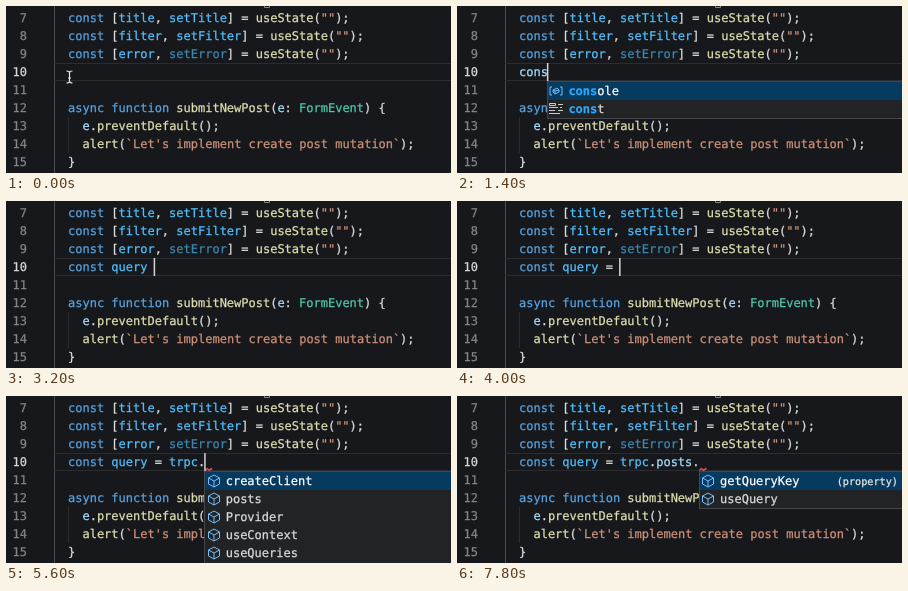
An HTML page with a canvas that plays this animation: 445 by 167 pixels, repeating every 8 s.

```html
<!DOCTYPE html>
<html lang="en">
<head>
<meta charset="utf-8">
<title>Code editor typing</title>
<style>
  html, body { margin: 0; width: 100%; height: 100%; overflow: hidden; background: #17181c; }
  canvas { display: block; width: 445px; height: 167px; }
</style>
</head>
<body>
<canvas id="stage"></canvas>
<script>
const W = 445, H = 167, LOOP = 8000;
const LEFT = 62, CHAR = 7.22, ROW = 18, MAX_ROWS = 5;
const FAMILY = '"DejaVu Sans Mono", monospace';
const COLORS = {
  text: '#dcdcdc', keyword: '#58a3e0', constant: '#4fc1ff', unused: '#3b87b0',
  call: '#dfdfb0', string: '#ce9178', type: '#4ec9b0', param: '#a8e0ff'
};

const canvas = document.getElementById('stage');
const ctx = canvas.getContext('2d');
const ratio = window.devicePixelRatio || 1;
canvas.width = W * ratio;
canvas.height = H * ratio;
ctx.scale(ratio, ratio);
ctx.lineJoin = 'round';
if ('textRendering' in ctx) ctx.textRendering = 'geometricPrecision';

const stateLine = (name, setter, setterColor = 'constant') => [
  ['const ', 'keyword'], ['[', 'text'], [name, 'constant'], [', ', 'text'],
  [setter, setterColor], ['] = ', 'text'], ['useState', 'call'],
  ['(', 'text'], ['""', 'string'], [');', 'text']
];

const CODE = {
  7: stateLine('title', 'setTitle'),
  8: stateLine('filter', 'setFilter'),
  9: stateLine('error', 'setError', 'unused'),
  13: [['  e', 'param'], ['.', 'text'], ['preventDefault', 'call'], ['();', 'text']],
  14: [['  alert', 'call'], ['(', 'text'],
       ["`Let's implement create post mutation`", 'string'], [');', 'text']],
  15: [['}', 'text']]
};

// After a dangling "const " the highlighter reads the next words as names.
const signature = dangling => [
  ['async ', dangling ? 'constant' : 'keyword'], ['function ', dangling ? 'param' : 'keyword'],
  ['submitNewPost', 'call'], ['(', 'text'], ['e', 'param'],
  [': ', 'text'], ['FormEvent', 'type'], [') {', 'text']
];

const typedLine = count => [
  ['const ', count < 5 ? 'param' : 'keyword'], ['query', 'constant'], [' = ', 'text'],
  ['trpc', 'constant'], ['.', 'text'], ['posts', 'param'], ['.', 'text']
];

// Moment at which each character of the typed line appears.
const KEY_TIMES = [
  800, 1000, 1200, 1400, 1600, 1800,
  2200, 2400, 2600, 2800, 3000, 3200, 3400, 3600,
  4200, 4400, 4600, 4800, 5200,
  5800, 6000, 6200, 6400, 6400, 7200
];

// Suggestion: [icon, label, detail, detail's right edge]
const WORDS = [
  ['method', 'confirm'], ['variable', 'console'], ['keyword', 'const'],
  ['keyword', 'continue'], ['method', 'count', 'console']
];
const errorCodes = suffix => ['variable', 'TRPC_ERROR_CODES_BY_' + suffix, '@trpc/server'];
const ALIASES = [
  ['variable', 'trpc', '(alias) const trpc:', 438],
  errorCodes('KEY'), errorCodes('KEY'), errorCodes('KEY'), errorCodes('NUMBER')
];
const MEMBERS = ['createClient', 'posts', 'Provider', 'useContext', 'useQueries']
  .map(name => ['field', name]);
const QUERIES = [['field', 'getQueryKey', '(property)', 441], ['field', 'useQuery']];

const POPUPS = [
  { from: 800, to: 1200, items: WORDS, prefix: 1 },
  { from: 1200, to: 1400, items: WORDS.slice(0, 4), prefix: 3 },
  { from: 1400, to: 1600, items: WORDS.slice(1, 3), prefix: 4 },
  { from: 1600, to: 1800, items: WORDS.slice(2, 3), prefix: 5 },
  { from: 4200, to: 5000, items: ALIASES, prefix: 1 },
  { from: 5400, to: 5800, items: MEMBERS, prefix: 0 },
  { from: 5800, to: 6400, items: MEMBERS.slice(1, 2), prefix: 1 },
  { from: 7400, to: LOOP, items: QUERIES, prefix: 0 }
];
// The matched part grows with each key while a list is open.
const prefixLength = (popup, time) => popup.prefix &&
  popup.prefix + KEY_TIMES.filter(t => t > popup.from && t <= time).length;

const baseline = line => 16 + (line - 7) * ROW;

// A hairline outline gives the glyphs a slightly heavier weight.
function text(str, x, y, color, { size = 12, weight = '', align = 'left' } = {}) {
  ctx.font = `${weight} ${size}px ${FAMILY}`;
  ctx.textAlign = align;
  ctx.fillStyle = ctx.strokeStyle = color;
  ctx.lineWidth = 0.25;
  ctx.fillText(str, x, y);
  ctx.strokeText(str, x, y);
}

function rect(x, y, w, h, color) {
  ctx.fillStyle = color;
  ctx.fillRect(x, y, w, h);
}

function stroke(path, color, x, y, width = 1) {
  ctx.save();
  ctx.translate(x, y);
  ctx.strokeStyle = color;
  ctx.lineWidth = width;
  ctx.stroke(new Path2D(path));
  ctx.restore();
}

function tokens(list, y, limit = Infinity) {
  let column = 0;
  for (const [str, color] of list) {
    text(str.slice(0, Math.max(0, limit - column)), LEFT + column * CHAR, y, COLORS[color]);
    column += str.length;
  }
}

const CUBE = 'M0-6 5.5-3V3L0 6-5.5 3V-3ZM-5.5-3 0 0 5.5-3M0 0V6';
const ICONS = {
  method: [CUBE, '#b180d7'],
  field: [CUBE, '#75beff'],
  variable: ['M-4-4H-6V4H-4M4-4H6V4H4M-3-1 1-3 3-1V1L-1 3-3 1ZM-3-1-1 0 3-1M-1 0V3', '#75beff'],
  keyword: ['M-6.5-5.5H-.5V-3.5H-6.5ZM2-4.5H7M-7-1.5H2M4-1.5H6M-7 1.5H-1M2 1.5H7M-7 4.5H4', '#cccccc']
};

function drawPopup({ items, prefix }, x) {
  const top = 76, left = Math.round(x);
  // Full lists run on below the stage.
  const height = items.length < MAX_ROWS ? items.length * ROW : H;
  rect(left - 1, top - 1, W, height + 2, '#45464a');
  rect(left, top, W, height, '#222325');
  rect(left, top, W, ROW, '#073a5f');
  items.forEach(([icon, label, detail, right], i) => {
    const y = top + i * ROW + 13;
    const labelX = x + 20.5;
    const selected = i === 0;
    stroke(...ICONS[icon], Math.round(x + 8.5), y - 4);
    text(label.slice(0, prefix), labelX, y, '#2aaaff', { weight: 'bold' });
    text(label.slice(prefix), labelX + prefix * CHAR, y, selected ? '#ffffff' : COLORS.text);
    if (!detail) return;
    const detailX = right || labelX + label.length * CHAR + 24;
    text(detail, detailX, y - 0.5, selected ? '#e4e8ec' : '#b4b4b4',
      { size: 10.2, align: right ? 'right' : 'left' });
  });
}

function draw(time) {
  const count = KEY_TIMES.filter(t => t <= time).length;
  const caretX = LEFT + count * CHAR;

  rect(0, 0, W, H, '#17181c');
  rect(48, 0, 1, H, '#4c4d52');
  rect(LEFT, 111, 1, 36, '#2b2c30');
  rect(48, 57, W - 48, 1, '#2b2c30');
  rect(48, 74, W - 48, 1, '#2b2c30');
  stroke('M0-1V1.5H5V-1', '#85868a', 258.5, 0);

  for (let line = 7; line <= 15; line++) {
    text(String(line), 21, baseline(line), line === 10 ? '#d8d8d8' : '#858585', { align: 'right' });
    if (CODE[line]) tokens(CODE[line], baseline(line));
  }
  tokens(signature(count === 6), baseline(12));
  tokens(typedLine(count), baseline(10), count);

  if (time >= 5200) stroke('M0 2 2 0 4 2 6 0 7 1', '#f14c4c', caretX, 72.5, 1.3);

  const popup = POPUPS.find(p => time >= p.from && time < p.to);
  if (popup) drawPopup({ items: popup.items, prefix: prefixLength(popup, time) }, caretX);

  // The caret stays lit after a key, then blinks.
  const idle = count ? time - KEY_TIMES[count - 1] : time + 500;
  if (idle % 1000 < 500) rect(caretX - 1, 57, 1.5, 18, '#d4d4d4');

  if (time < 800) {
    const beam = 'M-3-6Q0-6 0-4Q0-6 3-6M0-4V4M-3 6Q0 6 0 4Q0 6 3 6M-1.5 1H1.5';
    stroke(beam, '#17181c', 63.5, 71, 2.5);
    stroke(beam, '#e4e4e4', 63.5, 71, 1.2);
  }
}

const start = performance.now();
function tick() {
  draw((performance.now() - start) % LOOP);
  requestAnimationFrame(tick);
}
tick();
</script>
</body>
</html>
```
